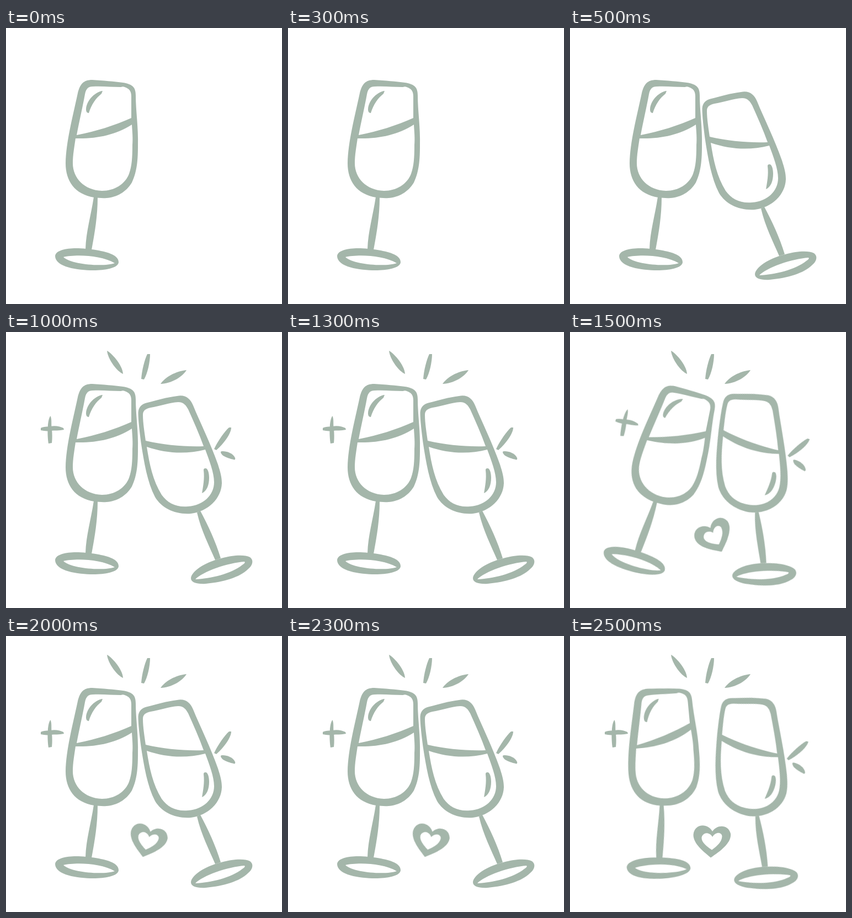
Animation, 500 px wide and 500 px high, one loop 3 s. Source, as an HTML page:

```html
<!DOCTYPE html>
<html lang="en">
<head>
<meta charset="utf-8">
<title>Cheers</title>
<style>
  html, body { margin: 0; width: 100%; height: 100%; overflow: hidden; background: #fff; }
  svg { display: block; width: 100vw; height: 100vh; fill: #a4b6aa; fill-rule: evenodd; }

  /* every pose is held, then switched at once */
  .left, .plus, .right, .spark, .heart { animation: 3s step-end infinite; }
  .left, .plus { transform-origin: 146.5px 418.7px; }
  .right { transform-origin: 390.5px 430px; }
  .heart { transform-origin: 257px 370px; }

  .left { animation-name: sway-left; }
  .plus { animation-name: sway-plus, show-spark; }
  .right { animation-name: sway-right, show-right; }
  .spark { animation-name: show-spark; }
  .heart { animation-name: sway-heart, show-heart; }

  @keyframes sway-left {
    0%, 66.666% { transform: none; }
    50% { transform: translate(-30px, -4.2px) rotate(11.4deg); }
    83.333%, 100% { transform: translate(14px, 1.1px) rotate(-5.3deg); }
  }
  @keyframes sway-plus {
    0%, 66.666%, 100% { transform: none; }
    50% { transform: translate(-30px, -4.2px) rotate(11.4deg); }
  }
  @keyframes sway-right {
    0%, 66.666% { transform: none; }
    50% { transform: translate(-38.5px, 8.2px) rotate(14.7deg); }
    83.333%, 100% { transform: translate(-35.3px, 7.4px) rotate(13.4deg); }
  }
  @keyframes sway-heart {
    0%, 50% { transform: translate(4.3px, -.5px) rotate(-29deg); }
    66.666% { transform: rotate(13deg); }
    83.333%, 100% { transform: none; }
  }
  @keyframes show-right {
    0% { visibility: hidden; }
    16.666%, 100% { visibility: visible; }
  }
  @keyframes show-spark {
    0% { visibility: hidden; }
    33.333%, 100% { visibility: visible; }
  }
  @keyframes show-heart {
    0% { visibility: hidden; }
    50%, 100% { visibility: visible; }
  }
</style>
</head>
<body>
<svg viewBox="0 0 500 500">
  <g class="left">
    <path d="M156 94C176 95 196 97 212 99C230 102 235 108 235 122C235 150 240 180 239 214C239 245 236 263 228 280C218 297 200 307 182 308C176 308.5 168 308 160 307C124 301 108 277 108 245C109 205 120 165 130 118C134 102 140 94 156 94Z
      M157 106C175 105 192 107 208 107C211 106 213 106 215 107C224 110 227 115 227 124L227 163C196 177 163 187 128 194C133 168 139 142 143 120C145 110 149 106 157 106Z
      M126 200C164 201 198 194 228 175C229 190 230 200 229 212C229 235 228 250 223 264C216 283 196 295 174 295C142 294 121 272 121 245C121 230 124 214 126 200Z"/>
    <path d="M159 306L166 307C166 340 161 370 155 402L144 401C145 368 154 340 159 306Z"/>
    <path d="M89 413C90 403 108 399 127 399C150 399 180 404 192 410C200 414 204 418 204 425C202 435 180 439 158 439C130 439 89 433 89 413Z
      M104 415C125 410 172 411 197 426C178 433 118 429 104 415Z"/>
    <path d="M175 114C163 115 146 130 145 147C145 152 147 154 150 154C155 138 163 127 173 119Z"/>
  </g>

  <g class="right">
    <path d="M310 116C325 113 334 121 339 133C352 165 370 200 384 240C388 253 391 262 391 274C390 302 366 325 335 329C306 331 282 319 270 299C256 272 250 236 244.5 200C242 180 239.5 160 239.5 146C240 136 246 130 256 128C272 124 292 118 310 116Z
      M262 137C280 134 296 128 312 127C322 127 326 133 330 140C340 162 350 185 358 207C322 208 288 205 253 197C251 182 248 165 248 150C248 142 253 139 262 137Z
      M255 208C290 220 326 222 361 213C368 232 377 255 377 272C377 295 358 314 330 316C308 318 293 310 282 295C266 269 260 240 255 208Z"/>
    <path d="M346 327L352 324C366 350 380 380 389 410L379 413C368 387 354 361 346 327Z"/>
    <path d="M335 446C336 434 358 418 390 410C412 404 432 403 442 408C450 414 446 424 438 430C424 444 394 453 362 456C346 457 335 454 335 446Z
      M343 448C356 434 402 418 432 416C434 418 431 420 428 422C408 438 370 447 343 448Z"/>
    <path d="M361 247C365 246 368 254 368 264C368 277 364 288 355 292C357 280 360 266 358 250C358 248 359 247 361 247Z"/>
    <g class="spark">
      <path d="M404 173L408 173C408 184 394 203 381 214L377 212C384 197 396 180 404 173Z"/>
      <path d="M389 217C391 214 411 217 415 228C416 231 414 232 412 231C404 229 389 225 389 217Z"/>
    </g>
  </g>

  <g class="plus">
    <path d="M80.500 152C83 158 82 164 82.500 172C84 182 84 194 83 201L77 202C75 190 74 160 80.500 152Z"/>
    <path d="M63 174C68 171 74 172 80 171C90 169 97 171 104 174L105 177C97 179 88 178 80 179C74 180 68 179 63 178Z"/>
  </g>

  <g class="spark">
    <path d="M183 34C190 37 211 59 212 76C202 72 185 51 183 34Z"/>
    <path d="M256 40L261 40C261 55 256 76 250 86L245 85C246 70 251 50 256 40Z"/>
    <path d="M327 69C319 82 300 93 280 94C288 82 307 71 327 69Z"/>
  </g>

  <path class="heart" d="M258 354C266 341 287 341 291 358C293 374 274 389 255 401.500C242 391 223 376 223.500 360C225 340 249 338 258 354Z
    M258 364C264 354 275 355 275.500 363C275 373 267 380 257 387.500C248 381 238 374 238.500 365C241 355 253 355 258 364Z"/>
</svg>
</body>
</html>
```
